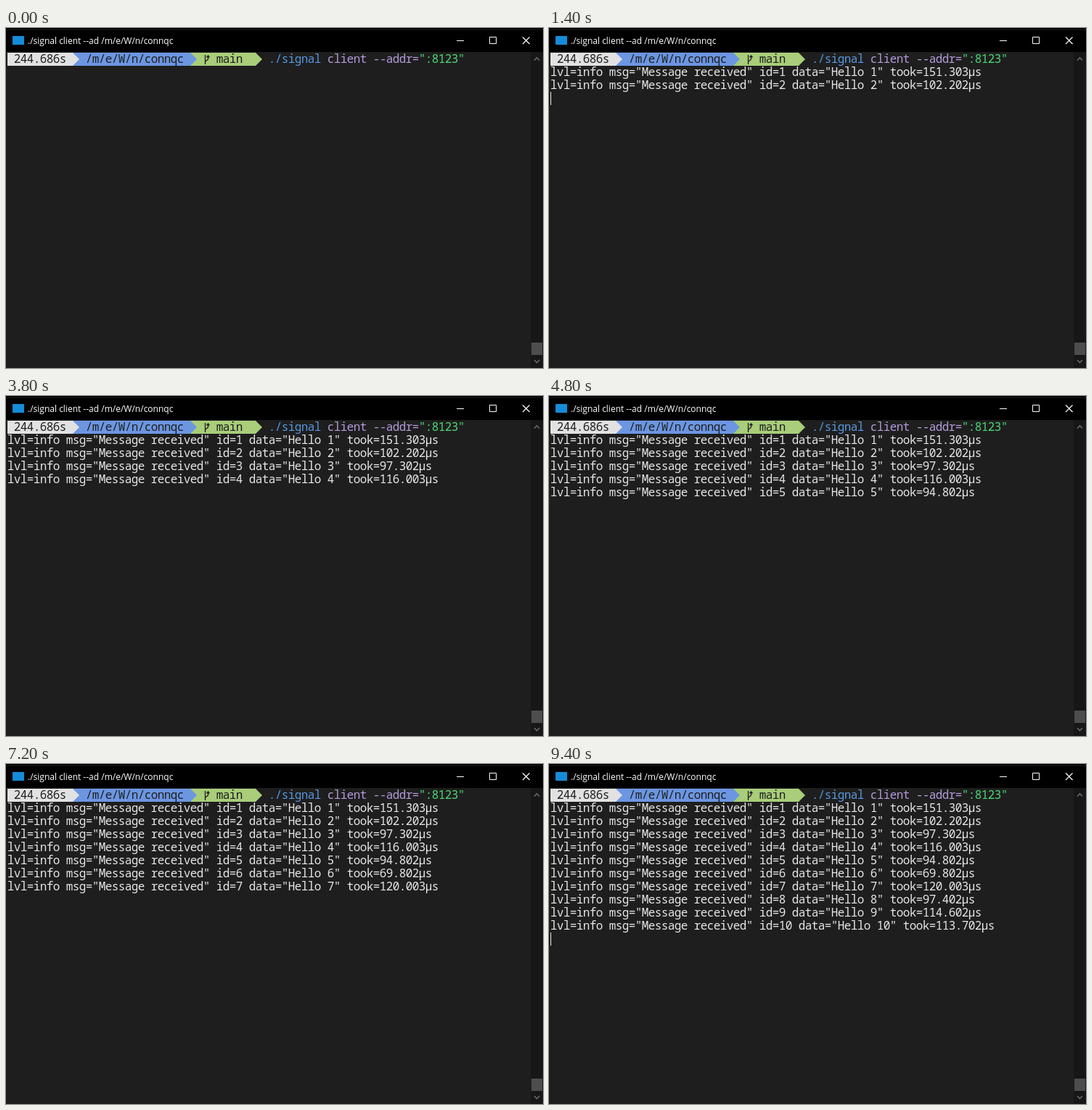
An HTML page that plays this animation: 740 px wide and 468 px high, repeating every 9600 ms.

```html
<!DOCTYPE html>
<html lang="en">
<head>
<meta charset="utf-8">
<title>Terminal</title>
<style>
  html, body { margin: 0; width: 100%; height: 100%; overflow: hidden; background: #1e1e1e; }
  svg { display: block; width: 740px; height: 468px; }
  .title { font: 12px "Open Sans", "Noto Sans", sans-serif; fill: #fff; }
  #screen {
    font: 16px "Noto Sans Mono", "DejaVu Sans Mono", monospace;
    font-stretch: semi-condensed;
    text-anchor: middle;
    fill: #e6e6e6;
  }
  #screen .dark { fill: #1e1e1e; }
  #screen .command { fill: #5797dc; }
  #screen .args { fill: #b39ad8; }
  #screen .string { fill: #4fd676; }
  .controls { fill: none; stroke: #fff; }
  .arrows { fill: none; stroke: #686868; stroke-width: 1.6; }
</style>
</head>
<body>
<svg viewBox="0 0 740 468">
  <rect width="740" height="468" fill="#1e1e1e"/>

  <!-- Title bar -->
  <rect width="740" height="33" fill="#000"/>
  <rect y="2" width="740" height="1" fill="#1c1c1c"/>
  <rect x="9" y="11" width="16" height="12" fill="#168bd8"/>
  <text class="title" x="30" y="22">./signal client --ad /m/e/W/n/connqc</text>
  <g class="controls">
    <path d="M621 17.5H631M666.5 12.5H675.5V21.5H666.5Z"/>
    <path d="M712 12.5L721.5 22M721.5 12.5L712 22" stroke-width="1.2"/>
  </g>

  <!-- Scrollbar -->
  <rect x="723" y="33" width="17" height="435" fill="#171717"/>
  <rect x="724" y="433" width="15" height="17" fill="#4d4d4d"/>
  <path class="arrows" d="M728 44.5L731.5 41L735 44.5M728 457L731.5 460.5L735 457"/>

  <!-- Prompt, each segment drawn over the one to its right -->
  <path d="M254 34H344L353 43L344 52H254Z" fill="#a9cd79"/>
  <path d="M92 34H254L263 43L254 52H92Z" fill="#6c96e2"/>
  <path d="M2 34H92L101 43L92 52H2Z" fill="#e2e2e2"/>
  <path d="M274.5 37V50M274.5 46.5L278.5 43V38M276.5 40.5L278.5 38L280.5 40.5" fill="none" stroke="#1e1e1e" stroke-width="1.3"/>

  <g id="screen"></g>
  <rect id="cursor" x="2" width="1" height="18" fill="#f0f0f0" visibility="hidden"/>
</svg>
<script>
  const LOOP = 9600, INTERVAL = 1000, FIRST = 400, BLINK_ON = 400;
  const LEFT = 2, TOP = 34, CELL = 9, ROW = 18, BASELINE = 14;
  const durations = [151.303, 102.202, 97.302, 116.003, 94.802, 69.802, 120.003, 97.402, 114.602, 113.702];
  const screen = document.getElementById("screen");
  const cursor = document.getElementById("cursor");

  // Like a terminal, centre every character in its own cell.
  function print(row, column, content, style = "") {
    const text = document.createElementNS(screen.namespaceURI, "text");
    const centres = Array.from(content, (_, i) => LEFT + CELL * (column + i + 0.5));
    text.setAttribute("x", centres.join(" "));
    text.setAttribute("y", TOP + ROW * row + BASELINE);
    text.setAttribute("class", style);
    text.textContent = content;
    screen.append(text);
    return text;
  }

  print(0, 1, "244.686s", "dark");
  print(0, 12, "/m/e/W/n/connqc", "dark");
  print(0, 32, "main", "dark");
  print(0, 40, "./signal", "command");
  print(0, 49, "client --addr=", "args");
  print(0, 63, '":8123"', "string");

  const lines = durations.map((micros, i) => {
    const id = i + 1;
    return print(id, 0, `lvl=info msg="Message received" id=${id} data="Hello ${id}" took=${micros.toFixed(3)}µs`);
  });

  const show = (element, visible) =>
    element.setAttribute("visibility", visible ? "visible" : "hidden");

  function draw() {
    const sinceFirst = performance.now() % LOOP - FIRST;
    const count = Math.floor(sinceFirst / INTERVAL) + 1;
    lines.forEach((line, i) => show(line, i < count));
    cursor.setAttribute("y", TOP + ROW * (count + 1));
    show(cursor, sinceFirst >= 0 && sinceFirst % INTERVAL < BLINK_ON);
    requestAnimationFrame(draw);
  }
  draw();
</script>
</body>
</html>
```
